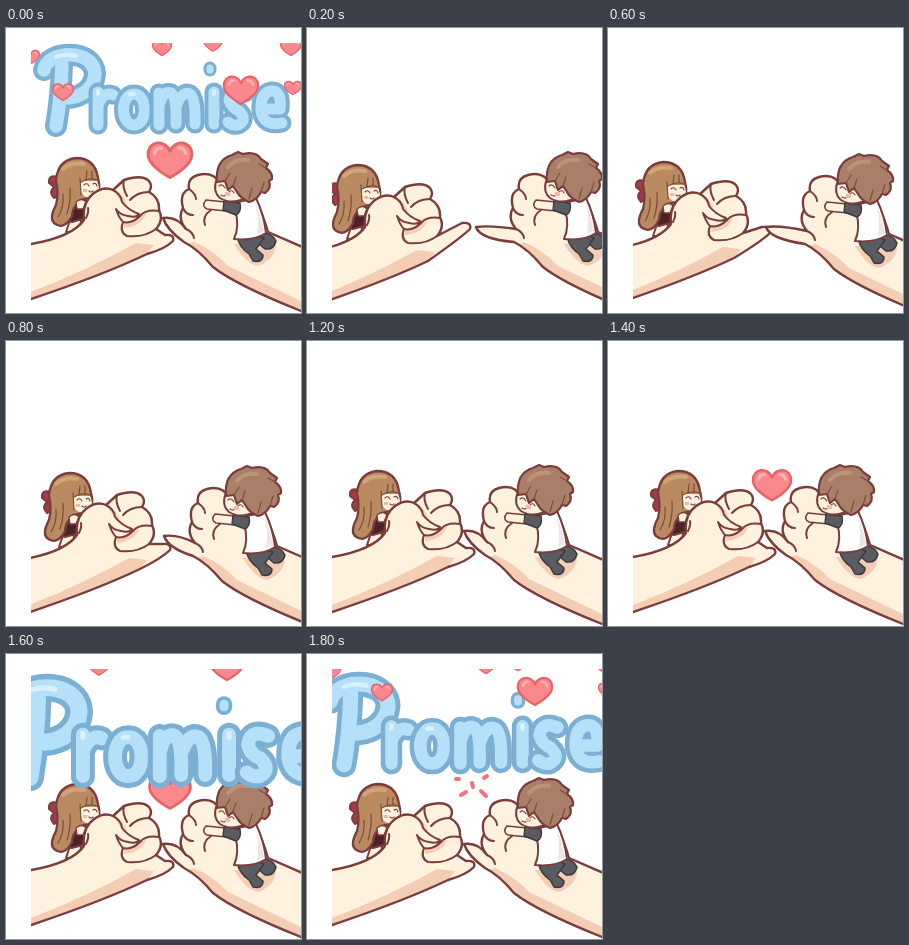
An HTML page that plays this animation: 295 px wide and 285 px high, repeating every 2 s.

```html
<!DOCTYPE html>
<html lang="en">
<head>
<meta charset="utf-8">
<title>Promise</title>
<style>
html, body { margin: 0; width: 100%; height: 100%; overflow: hidden; background: #fff; }
svg { display: block; width: 100%; height: 100%; }
</style>
</head>
<body>
<svg viewBox="0 0 295 285" role="img" aria-label="Promise">
  <clipPath id="card"><path d="M25 15H295V285H25z"/></clipPath>
  <g id="scene" clip-path="url(#card)" stroke-linecap="round" stroke-linejoin="round"></g>
</svg>
<script>
const LINE = '#7b3d3c', SKIN = '#fef1de', SHADE = '#f3cdb4', DARK = '#5b5b62', EDGE = '#3d3a40';
const STEP = 200, STEPS = 10;
const scene = document.getElementById('scene');

const path = (d, fill = 'none', stroke = LINE, width = 2) =>
  `<path d="${d}" fill="${fill}" stroke="${stroke}" stroke-width="${width}"/>`;
const flat = (d, fill) => path(d, fill, 'none', 0);
const move = (x, y, body, scale = 1) =>
  `<g transform="translate(${x} ${y}) scale(${scale})">${body}</g>`;

// Hand offsets and little-finger tips, from apart to hooked
const POSES = {
  apart:  { left: [-20, 7], leftTip: [163, 199], right: [29, 0], rightTip: [169, 199] },
  touch:  { left: [-15, 4], leftTip: [162, 203], right: [19, 2], rightTip: [158, 199] },
  near:   { left: [-7, 2],  leftTip: [164, 207], right: [9, 1],  rightTip: [158, 195] },
  hooked: { left: [0, 0],   leftTip: [167, 211], right: [0, 0],  rightTip: [157, 190] }
};

const GIRL =
  path('M64 192L60 204H74L75 192z', SKIN) +
  path('M52 149Q42 146 43 155L48 159Q42 164 48 170Q56 167 55 158z', '#a33a48') +
  path('M62 178Q60 194 66 194L80 190V172z', '#4b2228') +
  path('M70 130Q89 130 92 150Q96 164 87 169L74 172Q66 180 66 188Q58 203 48 195Q43 190 50 177Q53 166 50 152Q52 132 70 130z', '#ba8a62', LINE, 2.3) +
  flat('M75 153H91Q96 163 88 168Q79 172 75 164z', SKIN) +
  path('M57 141Q65 134 78 136', 'none', '#d3a477', 4) +
  path('M75 167L74 150M80 152L81 143M86 151L86 143M91 152Q83 149 75 154M57 166Q58 180 52 189M64 160Q65 174 61 186', 'none', '#7d4d37', 1.2) +
  path('M78 157Q81 154 83 158M87 156Q90 154 91 158M83 163Q85 165 87 163', 'none', LINE, 1.1) +
  flat('M77 161h4v3h-4z', '#f8b5aa') +
  path('M70 174Q76 169 80 174L77 181L71 181z', SKIN, LINE, 1.3);

const BOY =
  path('M247 211L259 221Q268 222 270 213Q267 206 258 205z', DARK, EDGE, 1.5) +
  path('M231 209Q234 220 243 226L247 233Q257 235 257 227L250 221L258 210L246 206z', DARK, EDGE, 1.5) +
  path('M229 182L232 174L250 170Q258 187 260 205Q248 213 228 211Q234 198 229 182z', '#fff') +
  flat('M249 174Q256 190 258 203L251 206Q254 190 249 174z', '#ece6e6') +
  path('M220 174L200 172Q195 178 201 181L220 183z', SKIN, LINE, 1.6) +
  path('M218 173L234 175Q236 184 230 187L217 182z', DARK, EDGE, 1.4) +
  path('M211 151Q206 163 214 170Q225 177 240 170L238 148z', SKIN) +
  path('M211 154Q209 132 226 127L232 124L237 126Q250 123 255 131L262 136L260 140Q267 145 266 151L263 153Q266 160 259 165L255 164Q251 172 243 174Q234 170 231 164L227 158L222 162L219 153z', '#aa7f69', LINE, 2.2) +
  path('M222 139Q229 130 242 132', 'none', '#bf9378', 4) +
  path('M219 153L224 145M227 158L230 149M255 164L258 154M243 171L246 160M260 140L253 136', 'none', '#7d4f3c', 1.2) +
  path('M213 158Q216 155 219 160M223 164Q226 161 228 165M215 167Q218 169 220 167', 'none', LINE, 1.1) +
  flat('M219 164h5v4h-5z', '#f8b5aa');

function leftHand([dx, dy], tip) {
  const x = tip[0] - dx, y = tip[1] - dy;
  const under = `Q${x - 8} ${y + 10} 141 226Q97 247 25 271L-10 284`;
  const edge = `M-10 226L25 216Q66 209 78 192Q76 174 88 165Q98 158 107 162L118 152Q136 146 143 153Q147 158 143 164Q154 170 153 182Q158 192 150 201L${x - 8} ${y - 4}Q${x + 2} ${y - 5} ${x} ${y + 2}${under}`;
  return move(dx, dy, GIRL +
    flat(edge, SKIN) +
    flat('M25 270V264Q82 242 130 215L148 217L141 226Q97 247 25 270z', SHADE) +
    flat('M118 194Q126 197 135 187L140 186Q136 198 118 200zM107 162Q118 165 122 180L116 175z', SHADE) +
    path(edge, 'none', LINE, 2.4) +
    path('M107 162Q115 166 116 174Q122 182 133 186Q131 190 122 188Q114 187 110 181M118 152Q116 159 121 168M143 164Q131 164 124 172M153 183Q140 181 134 188Q126 196 117 194Q113 204 121 208Q138 210 150 201M110 181Q113 190 117 194M80 190Q83 184 82 180'));
}

function rightHand([dx, dy], tip) {
  const x = tip[0] - dx, y = tip[1] - dy;
  const edge = `M${x} ${y}Q${x + 14} ${y - 2} 180 201Q171 190 177 180Q173 165 183 161Q181 150 192 147Q208 143 214 156L250 172Q258 190 262 204L340 238V306L295 283Q230 257 207 239Q192 221 178 214Q${x + 4} ${y + 12} ${x} ${y}z`;
  return move(dx, dy, flat(edge, SKIN) +
    flat('M188 214Q207 222 222 238L295 273V283Q230 257 207 239Q196 226 182 216z', SHADE) +
    flat('M228 216Q240 236 252 238Q268 232 270 218z', SHADE) +
    path(edge, 'none', LINE, 2.4) +
    path('M177 180Q180 187 187 187M183 161Q190 166 190 171M180 201Q187 204 188 210M205 182Q196 188 199 197') +
    BOY);
}

// Heart centred on x, y with width w
const heart = (x, y, w) => move(x, y,
  path('M0 16Q-20 5 -20 -5C-20 -18 -4 -19 0 -8C4 -19 20 -18 20 -5Q20 5 0 16z', '#fb888c', '#ea6166', 2.6) +
  path('M-14 -6Q-13 -11 -8 -11M8 -11Q13 -11 14 -6', 'none', '#fdb3b4', 3), w / 42);

// Balloon lettering: skeleton strokes, first the rim and then the inside
const P = 'M56 36Q55 70 50 98M38 42C41 22 88 20 89 46C88 60 76 69 62 70';
const LETTERS = [
  'M92 64V97M92 77Q98 63 107 67',
  'M128 66C142 66 142 97 128 97C114 97 114 66 128 66',
  'M153 65V97M153 78Q157 62 165 65Q171 69 170 96M170 79Q176 62 184 66Q190 70 189 96',
  'M208 64V96',
  'M239 65Q225 59 223 72Q225 80 233 83Q242 92 232 97Q226 98 222 94',
  'M257 81H274Q276 62 265 63Q254 65 255 83Q258 99 276 95'
];
const balloon = (d, outer, inner) =>
  path(d, 'none', '#7bafd3', outer) + path(d, 'none', '#b5e0fa', inner);
const TITLE = balloon(P, 22, 13.5) +
  LETTERS.map(d => balloon(d, 19, 11)).join('') +
  balloon('M204 40V42', 13, 7) +
  path('M50 29Q60 25 70 28M92 63V66M124 66H128M208 63V66', 'none', '#d9f0fd', 4);

const title = scale => move(150 - 150 * scale, 0, TITLE, scale);

// Falling hearts: resting x, y, width, sideways drift per step
const FALLING = [[57, 64, 22, 18], [235, 62, 36, -7], [156, 20, 20, 23], [207, 16, 19, 4],
                 [285, 19, 22, 14], [25, 29, 18, 0], [287, 60, 18, 13]];
const shower = left => FALLING.map(([x, y, w, drift]) =>
  heart(x + drift * left, y * (1 - 0.4 * left), w)).join('');

const BURST = path('M149 125H152M154 141L159 138M165 129L166 133M177 124L180 122M174 137L179 142', 'none', '#f4727b', 4);

function draw(step) {
  const pose = POSES[['hooked', 'apart', 'apart', 'touch', 'near'][step] || 'hooked'];
  let art = leftHand(pose.left, pose.leftTip) + rightHand(pose.right, pose.rightTip);
  if (step === 7) art += heart(164, 144, 40);
  if (step === 8) art += heart(164, 138, 43) + title(1.26) + shower(2);
  if (step === 9) art += BURST + title(1.13) + shower(1);
  if (step === 0) art += title(1) + heart(164, 132, 46) + shower(0);
  scene.innerHTML = art;
}

let shown = -1;
const start = performance.now();
function tick() {
  const step = Math.floor((performance.now() - start) / STEP) % STEPS;
  if (step !== shown) draw(shown = step);
  requestAnimationFrame(tick);
}
tick();
</script>
</body>
</html>
```
